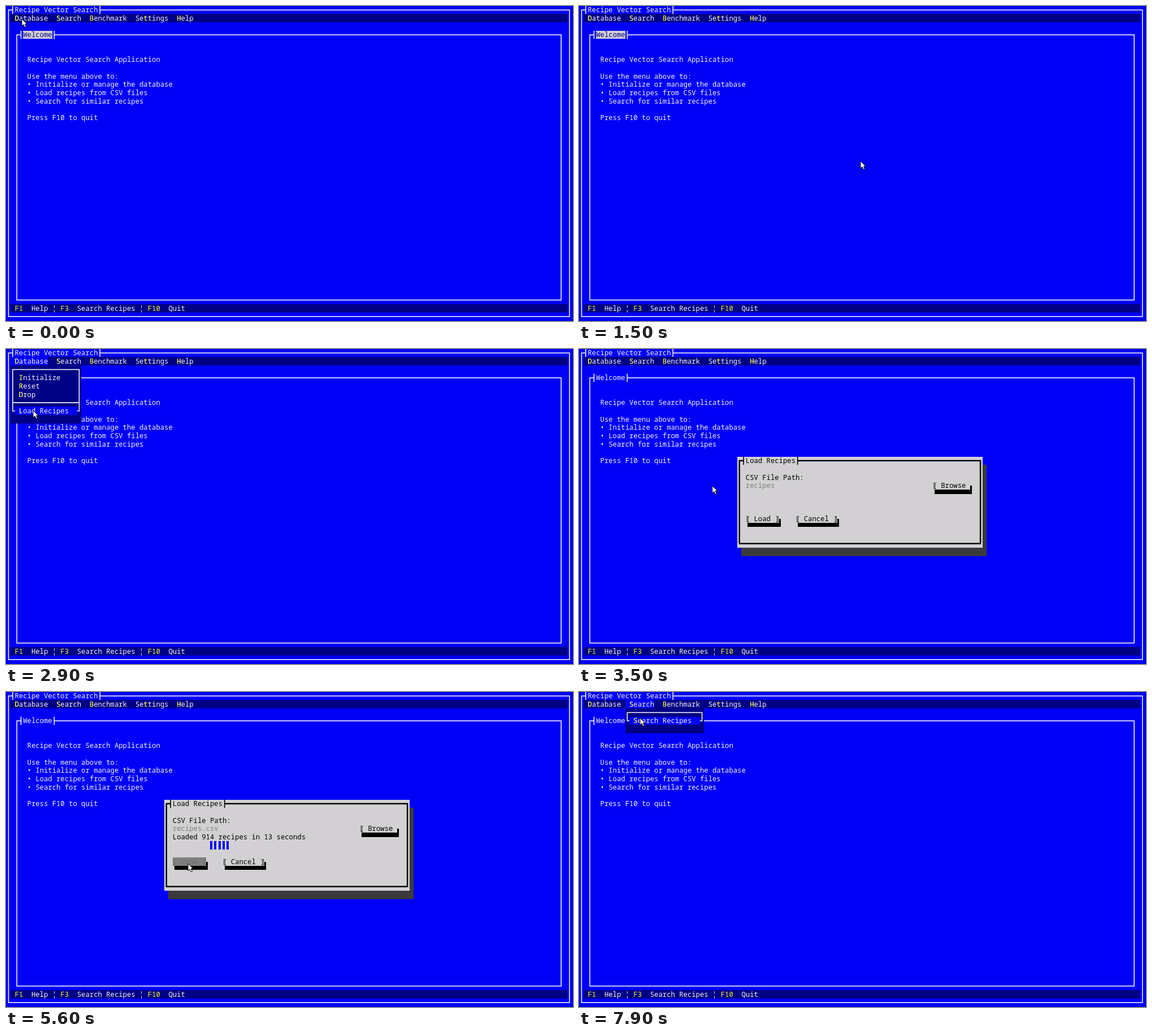
Recreate the animation shown at these times as an HTML page with a canvas. Size 1003 px wide and 558 px high, loop 8 s.

```html
<!DOCTYPE html>
<html lang="en">
<head>
<meta charset="utf-8">
<title>Recipe Vector Search</title>
<style>
html, body { margin: 0; width: 100%; height: 100%; overflow: hidden; background: #0000f6; }
canvas { display: block; }
</style>
</head>
<body>
<canvas id="stage" width="1003" height="558"></canvas>
<script>
const ctx = document.getElementById('stage').getContext('2d');
const LOOP = 8000, CW = 7.35, RH = 14.68;
const BLUE = '#0000f6', NAVY = '#000084', WHITE = '#f4f4fa', YELLOW = '#f0f03c';
const GRAY = '#d2d0d3', DIM = '#808080', BLACK = '#000', SHADOW = '#3a3a3c';

// Everything sits on a grid of character cells.
const X = col => 0.8 + col * CW;
const Y = row => -0.3 + row * RH;
const midX = col => X(col + 0.5);
const midY = row => Y(row + 0.5);

function fill(col, row, cols, rows, color) {
  ctx.fillStyle = color;
  const x = Math.round(X(col)), y = Math.round(Y(row));
  ctx.fillRect(x, y, Math.round(X(col + cols)) - x, Math.round(Y(row + rows)) - y);
}

function text(col, row, str, color = WHITE) {
  ctx.fillStyle = color;
  ctx.fillText(str, X(col), midY(row) + 4.3);
}

function hotText(col, row, str, hot = 0) {
  text(col, row, str);
  text(col + hot, row, str[hot], YELLOW);
}

function line(x1, y1, x2, y2, color = WHITE, width = 1.6) {
  ctx.strokeStyle = color;
  ctx.lineWidth = width;
  ctx.beginPath();
  ctx.moveTo(x1, y1);
  ctx.lineTo(x2, y2);
  ctx.stroke();
}

function box(c1, r1, c2, r2, color = WHITE, width = 1.6) {
  ctx.strokeStyle = color;
  ctx.lineWidth = width;
  ctx.strokeRect(midX(c1), midY(r1), midX(c2) - midX(c1), midY(r2) - midY(r1));
}

// Title set into the top edge of a frame, between two upright ticks.
function frameTitle(col, row, str, back, color = WHITE, lit = false) {
  const end = col + str.length;
  fill(col - 0.5, row, str.length + 1, 1, back);
  if (lit) fill(col, row, str.length, 1, GRAY);
  text(col, row, str, lit ? NAVY : color);
  for (const c of [col - 1, end]) line(midX(c), Y(row), midX(c), Y(row + 1), color);
}

const menus = [['Database', 2, 0], ['Search', 12, 0], ['Benchmark', 20, 0], ['Settings', 31, 2], ['Help', 41, 0]];

function drawScreen(openMenu, titleLit) {
  ctx.fillStyle = BLUE;
  ctx.fillRect(0, 0, 1003, 558);
  box(0, 0, 135, 37);
  frameTitle(2, 0, 'Recipe Vector Search', BLUE);

  fill(1, 1, 134, 1, NAVY);
  for (const [name, col, hot] of menus) {
    if (name === openMenu) fill(col - 1, 1, name.length + 1, 1, BLUE);
    hotText(col, 1, name, hot);
  }

  box(2, 3, 133, 35);
  frameTitle(4, 3, 'Welcome', BLUE, WHITE, titleLit);
  text(5, 6, 'Recipe Vector Search Application');
  text(5, 8, 'Use the menu above to:');
  text(5, 9, '• Initialize or manage the database');
  text(5, 10, '• Load recipes from CSV files');
  text(5, 11, '• Search for similar recipes');
  text(5, 13, 'Press F10 to quit');

  fill(1, 36, 134, 1, NAVY);
  text(2, 36, 'F1', YELLOW);
  text(6, 36, 'Help ¦');
  text(13, 36, 'F3', YELLOW);
  text(17, 36, 'Search Recipes ¦');
  text(34, 36, 'F10', YELLOW);
  text(39, 36, 'Quit');
}

// An empty item is a separator.
function dropdown(col, cols, items, pointerY) {
  const last = col + cols - 1;
  fill(col, 2, cols, items.length + 2, NAVY);
  box(col, 2, last, items.length + 2);
  items.forEach((item, i) => {
    const row = 3 + i;
    if (!item) return line(midX(col), midY(row), midX(last), midY(row));
    if (pointerY >= Y(row) && pointerY < Y(row + 1)) fill(col + 1, row, cols - 2, 1, BLUE);
    hotText(col + 2, row, item);
  });
}

function button(col, row, cols, label, { disabled = false, clipped = false } = {}) {
  const ink = disabled ? '#707070' : BLACK;
  fill(col + 0.5, row + 1, cols, 0.5, BLACK);
  fill(col + cols, row + 0.5, 0.5, 1, BLACK);
  if (disabled) fill(col, row, cols, 1, DIM);
  text(col + 0.1, row, '⟦', ink);
  text(col + 2, row, label, ink);
  if (!clipped) text(col + cols - 0.9, row, '⟧', ink);
}

function drawDialog(t) {
  const seconds = Math.floor(3 + (t - 4400) / 120 + 1e-6);
  const loading = seconds >= 0;
  fill(39, 14, 59, 11, SHADOW);
  fill(38, 13, 59, 11, GRAY);
  box(38, 13, 96, 23, BLACK, 2.4);
  frameTitle(40, 13, 'Load Recipes', GRAY, BLACK);
  text(40, 15, 'CSV File Path:', BLACK);

  const typed = 'recipes.csv'.slice(0, Math.max(0, Math.floor((t - 3200) / 40)));
  text(40, 16, typed, DIM);
  if (Math.floor(t / 400) % 2) {
    const caret = X(40 + typed.length) + 0.7;
    line(caret, Y(16), caret, Y(17), '#606060', 1);
  }
  button(85, 16, 9, 'Browse', { clipped: true });

  if (seconds >= 3) {
    const count = Math.round(10 + (seconds - 3) * 90.4);
    text(40, 17, `Loaded ${count} recipes in ${seconds} seconds`, BLACK);
  }
  if (loading) {
    for (let i = Math.max(0, seconds - 4); i <= seconds; i++) fill(40 + i, 18, 0.55, 1, BLUE);
  }
  button(40, 20, 8, 'Load', { disabled: loading });
  button(52, 20, 10, 'Cancel');
}

// time, x, y
const pointerPath = [
  [0, 28, 23], [400, 28, 23], [1200, 498, 275], [1800, 498, 275], [2300, 28, 23], [2450, 28, 23],
  [2850, 48, 109], [3000, 48, 109], [3800, 322, 304], [6250, 322, 304], [6700, 138, 103],
  [7150, 110, 22], [7300, 110, 22], [7500, 108, 46], [LOOP, 108, 46]
];

function pointerAt(t) {
  const i = pointerPath.findIndex(p => p[0] > t);
  const [t0, x0, y0] = pointerPath[i - 1], [t1, x1, y1] = pointerPath[i];
  const k = (t - t0) / (t1 - t0), e = k * k * (3 - 2 * k);
  return [x0 + (x1 - x0) * e, y0 + (y1 - y0) * e];
}

const arrow = new Path2D('M0 0V12.5L3 9.8L5.2 14.6L7.6 13.5L5.4 8.9H9.3Z');

function drawPointer(x, y) {
  ctx.save();
  ctx.translate(x, y);
  ctx.fillStyle = '#fff';
  ctx.strokeStyle = BLACK;
  ctx.lineWidth = 1;
  ctx.fill(arrow);
  ctx.stroke(arrow);
  ctx.restore();
}

function draw(now) {
  const t = now % LOOP;
  const [x, y] = pointerAt(t);
  const dialog = t >= 3000 && t < 6200;
  const openMenu = t >= 2400 && t < 3000 ? 'Database' : t >= 7300 ? 'Search' : '';
  ctx.font = '500 12.25px "Noto Sans Mono", "DejaVu Sans Mono", monospace';
  drawScreen(openMenu, !dialog && !openMenu);
  if (openMenu === 'Database') dropdown(1, 17, ['Initialize', 'Reset', 'Drop', '', 'Load Recipes'], y);
  if (openMenu === 'Search') dropdown(11, 19, ['Search Recipes'], y);
  if (dialog) drawDialog(t);
  drawPointer(x, y);
  requestAnimationFrame(draw);
}
requestAnimationFrame(draw);
</script>
</body>
</html>
```
